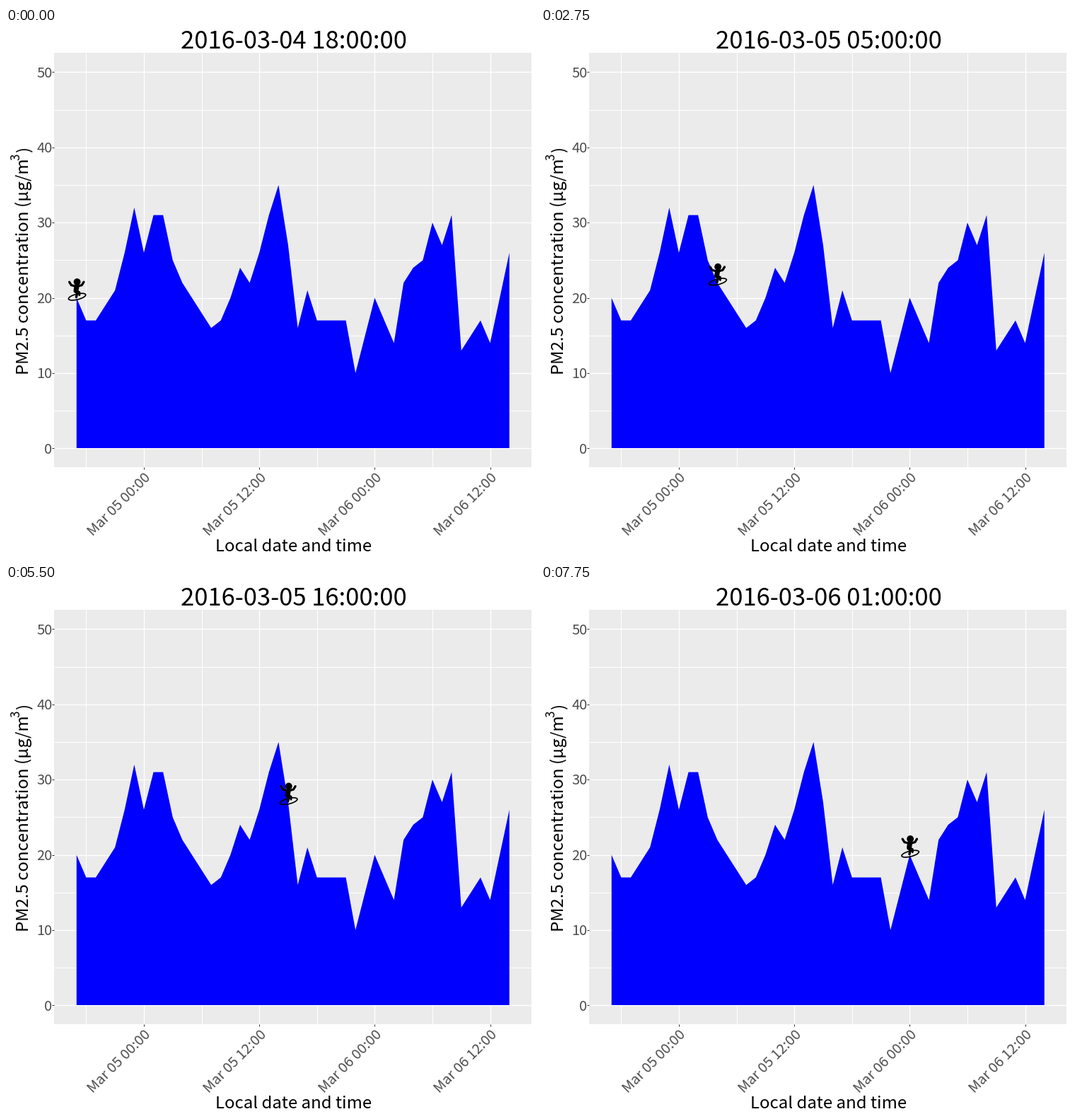
Write a matplotlib script that moves like this. It is 748 px wide and 748 px high and loops after 8000 ms.

```python
import matplotlib.pyplot as plt
from matplotlib.animation import FuncAnimation
from matplotlib.patches import Ellipse, Polygon, Rectangle
from matplotlib.transforms import Affine2D

SIZE, DPI = 748, 100
PX = 72 / DPI  # points per pixel
FRAMES, INTERVAL = 32, 250
START_HOUR, LAST_HOUR = 18, 45
LEFT, RIGHT, TOP, BOTTOM = 68, 743, 35, 621
GREY, TICK = "#4d4d4d", "#333333"

plt.rcParams["font.family"] = ["Noto Sans CJK JP", "DejaVu Sans"]

# Turning points: hour, level and, for curved runs, how the run bends
TURNS = [(0, 20), (1, 17), (6, 32, 2.5), (7, 26), (8, 31), (9, 31),
         (14, 16, 0.6), (17, 24, 2), (18, 22), (21, 35), (23, 16, 1.25),
         (24, 21), (25, 17), (28, 17), (29, 10), (31, 20), (33, 14),
         (36, 25, 0.3), (37, 30), (38, 27), (39, 31), (40, 13), (42, 17),
         (43, 14), (LAST_HOUR, 26)]


def level(hour):
    """Whole reading at an hour, eased between its turning points."""
    for (h0, v0, *_), (h1, v1, *bend) in zip(TURNS, TURNS[1:]):
        if hour <= h1:
            t = (hour - h0) / (h1 - h0)
            return round(v0 + (v1 - v0) * t ** (bend[0] if bend else 1))


def x_at(hour):
    return 99.75 + 13.6 * hour


def y_at(value):
    return 594.4 - 10.64 * value


fig = plt.figure(figsize=(SIZE / DPI, SIZE / DPI), dpi=DPI, facecolor="white")
ax = fig.add_axes([0, 0, 1, 1])
ax.set_xlim(0, SIZE)
ax.set_ylim(SIZE, 0)
ax.axis("off")


def label(x, y, text, size, color="black", ha="left", angle=0):
    return ax.text(x, y, text, fontsize=size * PX, color=color, ha=ha,
                   va="baseline", rotation=angle, rotation_mode="anchor")


def line(xs, ys, color, width, **style):
    ax.plot(xs, ys, color=color, lw=width * PX, **style)


def rule(xs, ys, color="white", width=1):
    line(xs, ys, color, width, solid_capstyle="butt", zorder=1)


# Panel, grid and ticks
ax.add_patch(Rectangle((LEFT, TOP), RIGHT - LEFT, BOTTOM - TOP, fc="#ebebeb",
                       ec="none", zorder=0))
for value in range(0, 51, 5):
    y, major = y_at(value), value % 10 == 0
    rule([LEFT, RIGHT], [y, y], width=1.4 if major else 1)
    if major:
        rule([LEFT - 3, LEFT], [y, y], TICK)
        label(65.5, y + 7.2, str(value), 20, GREY, "right")

for hour in range(1, LAST_HOUR, 6):
    x, major = x_at(hour), hour % 12 == 7
    rule([x, x], [TOP, BOTTOM], width=1.4 if major else 1)
    if major:
        clock = START_HOUR + hour - 1
        rule([x, x], [BOTTOM, BOTTOM + 3], TICK)
        text = f"Mar {4 + clock // 24:02d} {clock % 24:02d}:00"
        label(x + 11, 636.5, text, 20, GREY, "right", 45)

# Area
base = round(y_at(0))
outline = [(x_at(h), y_at(level(h))) for h in range(LAST_HOUR + 1)]
outline += [(x_at(LAST_HOUR), base), (x_at(0), base)]
ax.add_patch(Polygon(outline, fc="blue", ec="none", zorder=2))

# Titles
label(406.3, 740, "Local date and time", 24, ha="center")
label(32.3, 489.5, "PM2.5 concentration (µg/m", 24, angle=90)
label(19.5, 186.5, "3", 17, angle=90)
label(32.3, 175, ")", 24, angle=90)
title = label(407, 29, "", 34.6, ha="center")

# Surfer, drawn around the point it rides on
offset = Affine2D()
place = offset + ax.transData


def limb(width, *points):
    line(*zip(*points), "black", width, transform=place, zorder=4,
         solid_capstyle="round", solid_joinstyle="round")


def oval(x, y, w, h, angle=0, **style):
    ax.add_patch(Ellipse((x, y), w, h, angle=angle, transform=place,
                         zorder=4, **style))


hip, neck = (-0.8, -10), (0.2, -16)
oval(0.8, -22.6, 9.8, 9.8, fc="black", ec="none")
limb(7, neck, hip)
for side in (-1, 1):
    limb(3.2, neck, (7.5 * side, -18), (10.2 * side, -22.5))
limb(3.4, hip, (0.8, -6), (-0.4, -1))
limb(3, hip, (4, -8), (4, -4))
oval(0.8, -1.5, 25, 7.8, -14, fc="none", ec="black", lw=1.7 * PX)


def update(frame):
    clock = START_HOUR + frame
    day, hour = 4 + clock // 24, clock % 24
    text = f"2016-03-{day:02d}"
    title.set_text(f"{text} {hour:02d}:00:00" if hour else text)
    offset.clear().translate(x_at(frame), y_at(level(frame)))
    return []


anim = FuncAnimation(fig, update, frames=FRAMES, interval=INTERVAL,
                     init_func=lambda: update(0), repeat=True, repeat_delay=0)
plt.show()
```
